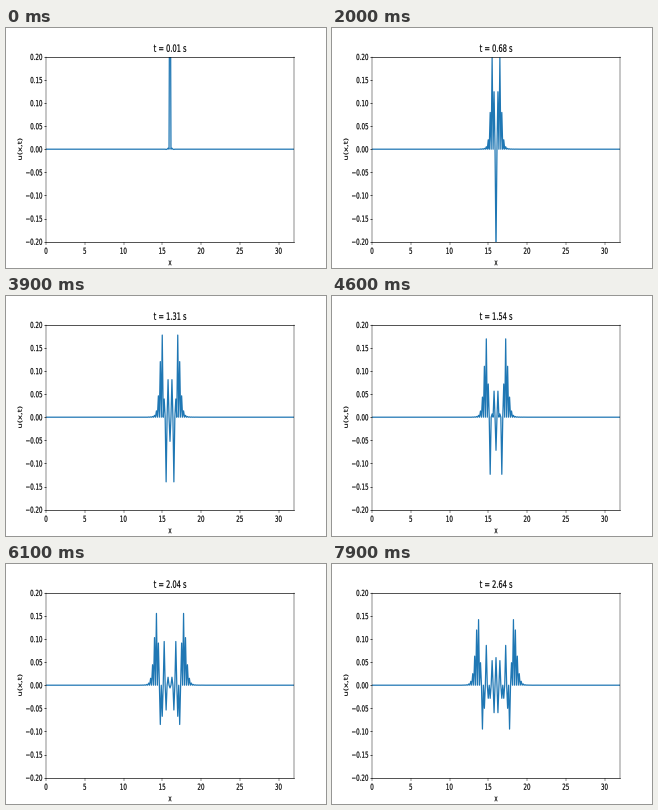
Recreate the animation shown at these times as a matplotlib script. Size 320 px wide and 240 px high, loop 8000 ms.

```python
import numpy as np
import matplotlib.pyplot as plt
from matplotlib.animation import FuncAnimation
from matplotlib.patches import PathPatch
from matplotlib.textpath import TextPath
from matplotlib.transforms import Affine2D, IdentityTransform

W, H, DPI = 320, 240, 100
FRAMES, INTERVAL = 80, 100
PX = 72 / DPI                    # one pixel in points
SX, SY = W / 8 / 72, H / 4 / 72  # an 8 x 4 inch layout squeezed onto the stage

# Wave equation on a grid where only every other node is excited
N, LENGTH = 256, 32.0
x = np.linspace(0, LENGTH, N + 1)
modes = N // 2
theta = 2 * np.pi * np.arange(modes) / modes
s = np.abs(np.sin(theta / 2))
basis = np.cos(np.outer(np.arange(-modes // 2, modes // 2 + 1), theta)) / modes


def wave(t):
    """Dispersive split of a spike; short waves lag behind and fade."""
    onset = 1 - np.exp(-t / 0.25)
    lag = 1.26 * onset * s**2
    fade = (0.3 * onset + 0.14 * t) * s**4
    u = np.zeros(N + 1)
    u[::2] = basis @ (0.64 * np.exp(-fade) * np.cos(8 * s * t - lag))
    return u


def text_path(text, px, py, size=10, align=0.5, angle=0):
    """Outline of a text whose baseline is anchored at pixel (px, py)."""
    path = TextPath((0, 0), text, size=size)
    box = path.get_extents()
    anchor = box.x0 + align * box.width
    move = Affine2D().translate(-anchor, 0).rotate_deg(angle)
    return path.transformed(move.scale(SX, SY).translate(px, py))


def add_text(*args, **kw):
    patch = PathPatch(text_path(*args, **kw), fc="black", ec="black", lw=0.12,
                      transform=IdentityTransform())
    return fig.add_artist(patch)


fig = plt.figure(figsize=(W / DPI, H / DPI), dpi=DPI, facecolor="white")
ax = fig.add_axes([0.125, 0.11, 0.775, 0.77])
ax.set(xlim=(0, LENGTH), ylim=(-0.2, 0.2),
       xticks=np.arange(0, 31, 5), yticks=np.linspace(-0.2, 0.2, 9))
left, bottom, right, top = 0.125 * W, 0.11 * H, 0.9 * W, 0.88 * H
mid_x, mid_y = (left + right) / 2, (bottom + top) / 2

thin_x, thin_y = 0.8 * SX * PX, 0.8 * SY * PX
ax.tick_params(axis="x", length=3.5 * SY * PX, width=thin_x, labelbottom=False)
ax.tick_params(axis="y", length=3.5 * SX * PX, width=thin_y, labelleft=False)
for side, spine in ax.spines.items():
    spine.set_linewidth(thin_x if side in ("left", "right") else thin_y)

for v in ax.get_xticks():
    add_text(f"{v:.0f}", left + v / LENGTH * (right - left), bottom - 14.6 * SY)
for v in np.linspace(-0.2, 0.2, 9).round(2) + 0.0:
    add_text(f"{v:.2f}".replace("-", "\u2212"), left - 7 * SX,
             mid_y + v / 0.4 * (top - bottom) - 3.8 * SY, align=1)
add_text("x", mid_x, bottom - 28.3 * SY)
add_text("u(x,t)", left - 43.7 * SX, mid_y, angle=90)

title_at = dict(px=mid_x, py=top + 6 * SY, size=12)
title = add_text("t = 0.01 s", **title_at)
line, = ax.plot(x, wave(0.01), color="#1f77b4", lw=1.25 * PX)


def update(k):
    t = 0.01 + k / 30
    line.set_ydata(wave(t))
    title.set_path(text_path(f"t = {t:.2f} s", **title_at))
    return line, title


anim = FuncAnimation(fig, update, frames=FRAMES, interval=INTERVAL,
                     repeat=True, repeat_delay=0, blit=False)
plt.show()
```
